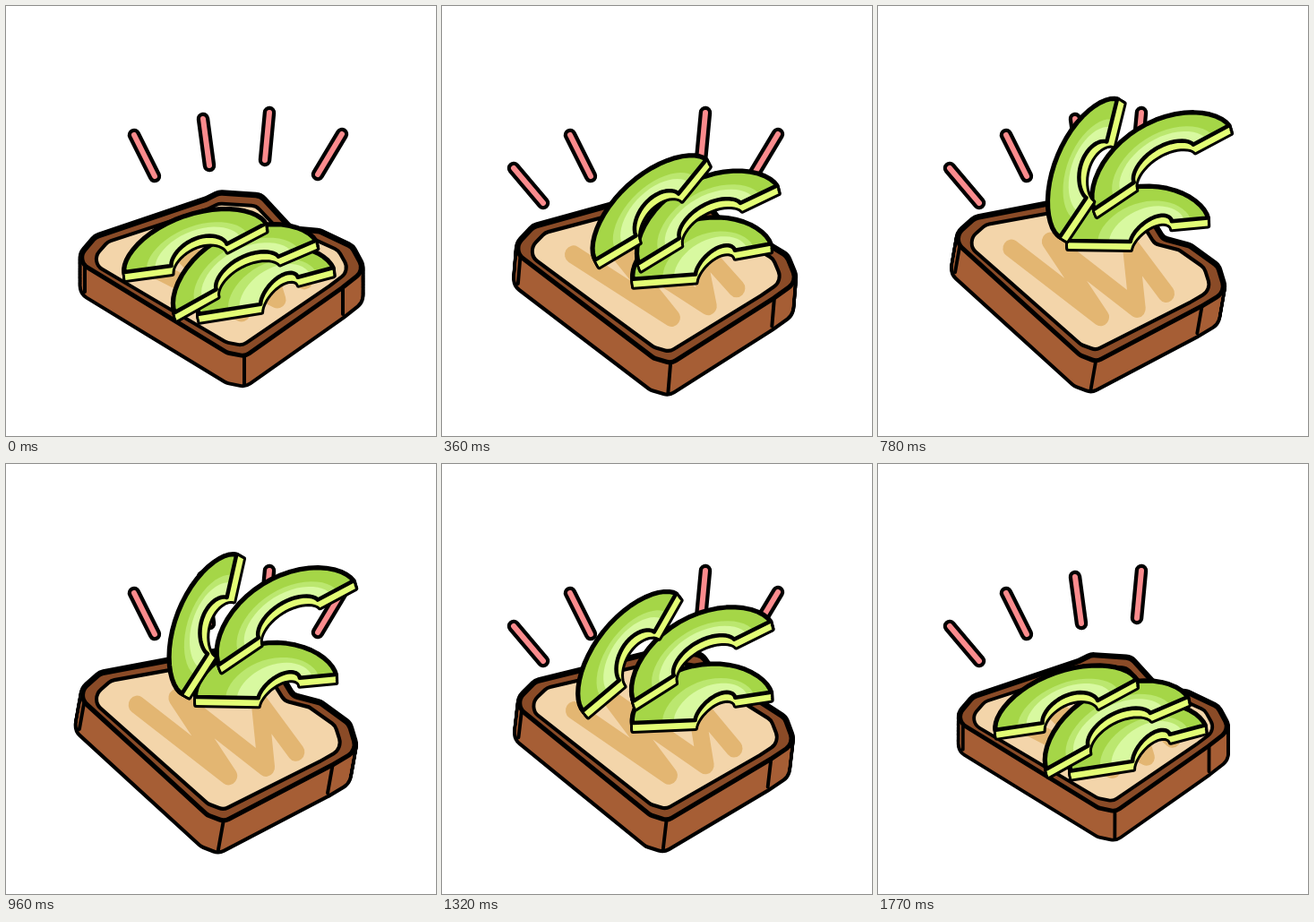
An HTML page with a canvas that plays this animation: 480 px wide and 480 px high, repeating every 1800 ms.

```html
<!DOCTYPE html>
<html lang="en">
<head>
<meta charset="utf-8">
<title>Avocado toast</title>
<style>
html, body { margin: 0; width: 100%; height: 100%; overflow: hidden; background: #fff; }
canvas { display: block; width: 480px; height: 480px; }
</style>
</head>
<body>
<canvas id="stage" width="480" height="480"></canvas>
<script>
const ctx = document.getElementById('stage').getContext('2d');
const LOOP = 1800, STEP = 30, RAY_STEP = 180, PULSE = 300;
const INK = '#000';

const rays = [
  [80, 181, 113, 220], [143, 144, 166, 190], [220, 126, 227, 178],
  [294, 119, 289, 172], [375, 143, 348, 188]
];

// corners of the upper face of the bread
const rim = [[78, 284], [100, 258], [224, 216], [238, 209], [284, 212], [318, 249],
  [350, 252], [386, 269], [400, 295], [376, 314], [267, 391], [247, 387]];
const creases = [[88, 289], [376, 314], [266, 392]];
const smear = [[147, 284], [263, 343], [190, 270], [303, 328], [283, 262], [333, 307]];

// rest and peak: centre x, y and angle in degrees; hollow: left, top, right in slice units
const slices = [
  { rest: [290, 318, 19], peak: [290, 247, 9], sway: 0, reach: 79, height: 47,
    hollow: [[-.13, -.26], [.21, .2], [.49, .06]] },
  { rest: [267, 302, 27], peak: [315, 176, 32], sway: 8, reach: 88, height: 50,
    hollow: [[-.4, .04], [.04, .42], [.49, .06]] },
  { rest: [211, 270, 19], peak: [230, 178, 69], sway: 14, reach: 83, height: 37,
    hollow: [[-.38, -.28], [.04, .26], [.42, -.2]] }
];

const mix = (a, b, k) => a.map((v, i) => v + (b[i] - v) * k);
const liftAt = t => Math.sin(Math.PI * t / LOOP) ** 1.45;

function trace(points, close = true) {
  ctx.beginPath();
  points.forEach(p => ctx.lineTo(p[0], p[1]));
  if (close) ctx.closePath();
}

function roundTrace(points, radius) {
  const n = points.length;
  ctx.beginPath();
  ctx.moveTo(...mix(points[n - 1], points[0], .5));
  points.forEach((p, i) => ctx.arcTo(...p, ...points[(i + 1) % n], radius));
  ctx.closePath();
}

function fill(color) {
  ctx.fillStyle = color;
  ctx.fill();
}

function line(color, width) {
  ctx.strokeStyle = color;
  ctx.lineWidth = width;
  ctx.stroke();
}

// sweep an outline along (dx, dy): ink around, colour on the sides
function extrude(points, path, dx, dy, color, ink) {
  const steps = Math.ceil(Math.hypot(dx, dy) / 1.5);
  const sweep = style => {
    for (let i = 0; i <= steps; i++) {
      path(points.map(([x, y]) => [x + dx * i / steps, y + dy * i / steps]));
      style();
    }
  };
  sweep(() => line(INK, ink));
  sweep(() => fill(color));
}

// crescent curve with slightly pointed ends
function arc(left, top, right) {
  const c = mix(left, right, .5);
  return Array.from({ length: 25 }, (_, i) => {
    const a = Math.PI * i / 24, x = -Math.cos(a), y = Math.sin(a) ** 1.2;
    return [0, 1].map(d => c[d] + x * (right[d] - c[d]) + y * (top[d] - c[d]));
  });
}

function drawRays(t) {
  const hidden = Math.floor(t / RAY_STEP) % rays.length;
  rays.forEach((r, i) => {
    if (i === hidden) return;
    trace([r.slice(0, 2), r.slice(2)], false);
    line(INK, 14.5);
    line('#fb8b8d', 6);
  });
}

function drawBread(t) {
  const lift = liftAt(t);
  const size = 1 - .047 * (1 - Math.cos(Math.PI * (t % PULSE) / PULSE)) / 2;
  const face = points => roundTrace(points, 13);
  const spread = rim.map(([x, y]) => [236 + (x - 236) * .9, 298 + (y - 298) * .87]);

  ctx.save();
  ctx.translate(238, 316);
  ctx.scale(size, size);
  ctx.translate(0, -47 - 2 * lift);
  ctx.transform(1, 0, -.04 * lift, 1 + .06 * Math.min(1, 3 * lift), 0, 0);
  ctx.rotate(.15 * lift);
  ctx.translate(-238, -269);

  extrude(rim, face, 0, 32, '#a65e35', 8);
  face(rim);
  fill('#8a4b27');
  line(INK, 5);
  face(spread);
  fill('#f3d5aa');
  trace(smear, false);
  line('#e3b672', 19);
  face(spread);
  line(INK, 4);
  creases.forEach(([x, y]) => {
    trace([[x, y], [x, y + 30]], false);
    line(INK, 4);
  });
  ctx.restore();
}

function drawSlice({ rest, peak, sway, reach, height, hollow }, t) {
  const [cx, cy, degrees] = mix(rest, peak, liftAt(t));
  const x = cx + sway * Math.sin(2 * Math.PI * t / LOOP);
  const sin = Math.sin(degrees * Math.PI / 180), cos = Math.cos(degrees * Math.PI / 180);
  const place = ([u, v]) => [
    x + u * reach * cos - v * height * sin,
    cy - u * reach * sin - v * height * cos
  ];
  const outer = arc(...[[-1, 0], [0, 1], [1, 0]].map(place));
  const inner = arc(...hollow.map(place));
  const band = k => inner.map((p, i) => mix(p, outer[i], k)).concat(inner.slice().reverse());
  const face = band(1);

  // steeper slices show their thickness more to the right
  const dx = 9 * sin * sin, dy = Math.sqrt(81 - dx * dx);
  extrude(face, trace, dx, dy, '#e3fd76', 6);
  [[1, '#a5d647'], [.52, '#bbe76f'], [.34, '#d8f9a0']].forEach(([k, color]) => {
    trace(band(k));
    fill(color);
  });
  trace(face);
  line(INK, 4.5);
}

function draw(t) {
  ctx.fillStyle = '#fff';
  ctx.fillRect(0, 0, 480, 480);
  ctx.lineJoin = ctx.lineCap = 'round';
  drawRays(t);
  drawBread(t);
  slices.forEach(s => drawSlice(s, t));
}

const start = performance.now();
function tick() {
  const t = (performance.now() - start) % LOOP;
  draw(Math.floor(t / STEP) * STEP);
  requestAnimationFrame(tick);
}
tick();
</script>
</body>
</html>
```
